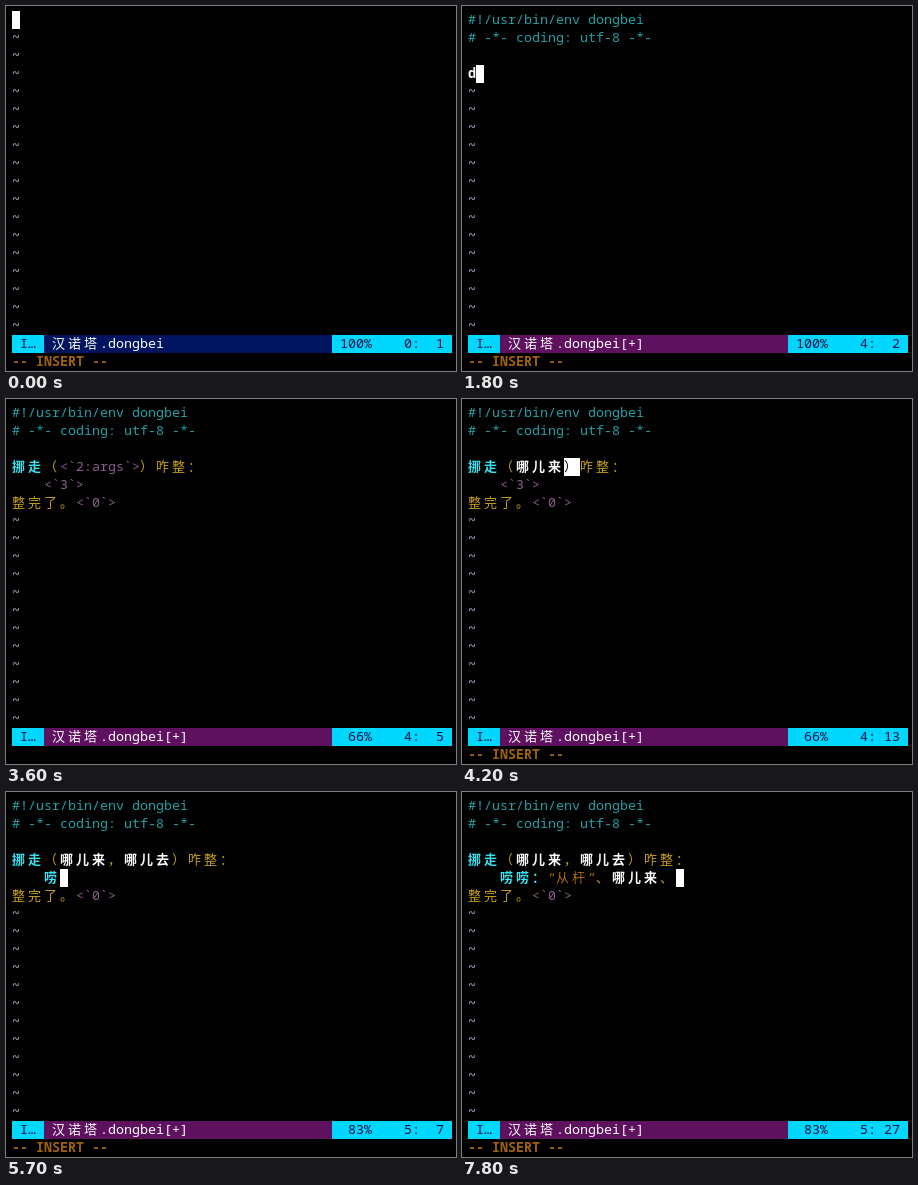
An HTML page that plays this animation: 450x365 px, repeating every 8 s.

```html
<!DOCTYPE html>
<html lang="zh-CN">
<head>
<meta charset="utf-8">
<style>
html, body { margin: 0; width: 100%; height: 100%; overflow: hidden; background: #000; }
#term {
  position: absolute; left: 0; top: 0; width: 450px; height: 365px; overflow: hidden;
  font: 13.333px/18px "Noto Sans Mono", "DejaVu Sans Mono", monospace;
  color: #fff; white-space: pre; font-variant-ligatures: none;
}
#term div { position: absolute; height: 18px; }
#term p { position: relative; top: -1px; margin: 0; height: 18px; }
.zh {
  font: 500 13px/0 "Noto Sans CJK SC", "Noto Sans CJK", sans-serif;
  letter-spacing: 3px; font-feature-settings: "halt" 0, "chws" 0; text-spacing-trim: space-all;
}
.key .zh, .name .zh { font-weight: 700; }
.note { color: #22a0a8; }
.key { color: #34e2f0; }
.name { color: #fff; }
.word { color: #c9a11c; }
.hole { color: #8a5f8f; }
.str { color: #b06a12; }
.tilde { color: #9090b4; font-weight: 700; }
.def { font-weight: 600; }
.dark { color: #000; }
#cursor { background: #fff; }
#text { left: 6px; top: 5px; }
#mode { left: 6px; top: 329px; width: 32px; }
#file { left: 38px; top: 329px; width: 288px; }
#pos { left: 326px; top: 329px; width: 120px; }
#mode, #pos { color: #000e40; }
#cmd { left: 6px; top: 347px; color: #a0620a; font-weight: 600; }
</style>
</head>
<body>
<div id="term">
  <div id="cursor"></div><div id="text"></div>
  <div id="mode"></div><div id="file"></div><div id="pos"></div>
  <div id="cmd"></div>
</div>
<script>
const STEP = 300, LOOP = 8000, ROWS = 18, CELL = 8, LINE = 18;
const $ = id => document.getElementById(id);

// Wide characters take two cells
const wide = t => t.replace(/[\u3000-\u9fff\uff00-\uffef]+/g, '<span class="zh">$&</span>');
const ink = (cls, t) =>
  `<span class="${cls}">${wide(t.replace(/</g, '&lt;').replace(/>/g, '&gt;'))}</span>`;
const para = t => `<p>${t}</p>`;
const hole = t => ink('hole', '<`' + t + '`>');

const top3 = [ink('note', '#!/usr/bin/env dongbei'), ink('note', '# -*- coding: utf-8 -*-'), ''];
const end = ink('word', '整完了。') + hole('0');

// "at" names the bracket the cursor covers
function func(name, args, body, at) {
  const mark = (b, id) => ink(at === id ? 'dark' : 'word', b);
  const list = args === null ? hole('2:args')
    : args.split('，').map(a => ink('name', a)).join(ink('word', '，'));
  return [...top3,
    ink('key', name) + mark('（', 'open') + list + mark('）', 'close') + ink('word', '咋整：'),
    '    ' + body, end];
}
const both = '哪儿来，哪儿去';
const say = (...parts) => func('挪走', both, parts.join(''));
const call = ink('key', '唠唠：');
const dot = ink('word', '、');
const from = ink('str', '“从杆”');
const typed = t => [...top3, ink('def', t)];
const hash = t => [ink('note', t)];

// lines, mode, row, column, cursor width in cells, command line shown
const steps = [
  [[''], 'I', 0, 1, 1, 1],
  [hash('#'), 'I', 1, 2, 1, 1],
  [hash('#!'), 'I', 1, 3, 1, 1],
  [hash('#!'), 'N', 1, 2, 0, 1],
  [top3, 'I', 3, 1, 1, 1],
  [typed(''), 'I', 4, 1, 1, 1],
  [typed('d'), 'I', 4, 2, 1, 1],
  [typed('de'), 'I', 4, 3, 1, 1],
  [typed('def'), 'I', 4, 4, 1, 1],
  [typed('def'), 'N', 4, 3, 0, 0],
  [func('', null, hole('3'), 'open'), 'I', 4, 1, 2, 0],
  [func('挪', null, hole('3'), 'open'), 'I', 4, 3, 2, 0],
  [func('挪走', null, hole('3')), 'I', 4, 5, 0, 0],
  [func('挪走', '', hole('3'), 'close'), 'I', 4, 7, 2, 1],
  [func('挪走', '哪儿来', hole('3'), 'close'), 'I', 4, 13, 2, 1],
  [func('挪走', '哪儿来，', hole('3'), 'close'), 'I', 4, 15, 2, 1],
  [func('挪走', both, hole('3'), 'close'), 'I', 4, 21, 2, 1],
  [say(hole('3')), 'I', 4, 21, 0, 0],
  [say(), 'I', 5, 5, 1, 1],
  [say(ink('key', '唠')), 'I', 5, 7, 1, 1],
  [say(ink('key', '唠唠')), 'I', 5, 9, 1, 1],
  [say(call), 'I', 5, 11, 1, 1],
  [say(call, ink('str', '“')), 'I', 5, 12, 1, 1],
  [say(call, ink('str', '“从杆')), 'I', 5, 16, 1, 1],
  [say(call, from, dot), 'I', 5, 19, 1, 1],
  [say(call, from, dot, ink('name', '哪儿来')), 'I', 5, 25, 1, 1],
  [say(call, from, dot, ink('name', '哪儿来'), dot), 'I', 5, 27, 1, 1]
];

function draw(i) {
  const [lines, mode, row, col, size, cmd] = steps[i];
  const tildes = Array(ROWS - lines.length).fill(ink('tilde', '~'));
  $('text').innerHTML = [...lines, ...tildes].map(para).join('');

  const line = Math.max(row, 1);
  $('cursor').style.cssText =
    `left:${6 + (col - 1) * CELL}px;top:${5 + (line - 1) * LINE}px;width:${size * CELL}px`;

  const pct = Math.floor(100 * line / lines.length) + '%';
  $('mode').innerHTML = para(` ${mode}… `);
  $('file').innerHTML = para(wide(' 汉诺塔.dongbei') + (i ? '[+]' : ''));
  $('pos').innerHTML = para(` ${pct.padStart(4)}    ${row}:${String(col).padStart(3)} `);
  $('mode').style.background = $('pos').style.background = mode === 'I' ? '#00d7ff' : '#d7ff00';
  $('file').style.background = i ? '#5e115f' : '#001560';
  $('cmd').innerHTML = para(cmd ? '-- INSERT --' : '');
}

let shown = -1;
const start = performance.now();
function tick() {
  const t = (performance.now() - start) % LOOP;
  const i = Math.min(Math.floor(t / STEP), steps.length - 1);
  if (i !== shown) draw(shown = i);
  requestAnimationFrame(tick);
}
tick();
</script>
</body>
</html>
```
